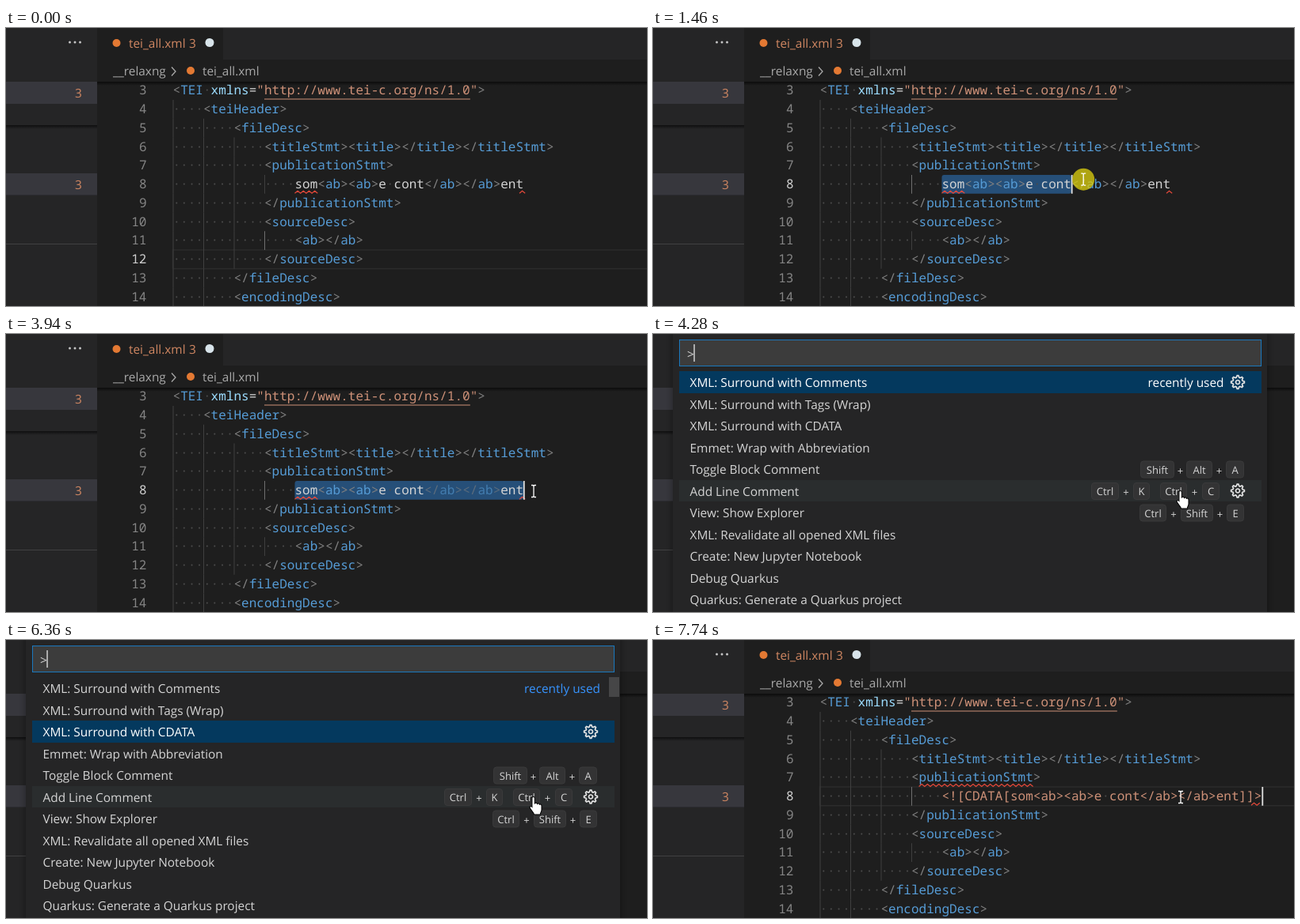
Write an HTML page that moves like this. It is 809 px wide and 352 px high and loops after 8000 ms.

```html
<!DOCTYPE html>
<html lang="en">
<head>
<meta charset="utf-8">
<title>Surround with CDATA</title>
<style>
  html, body { margin: 0; width: 100%; height: 100%; overflow: hidden; background: #1e1e1e; }
  svg { display: block; }
  text { text-rendering: geometricPrecision; }
  .ui { font: 15.4px "Open Sans", "Noto Sans", sans-serif; }
  .ui text { fill: #d4d4d4; }
  .ui .warn { fill: #d08762; }
  .ui .crumb { fill: #a9a9a9; }
  .key { font-size: 13px; text-anchor: middle; }
  .mono { font: 16.04px "Noto Sans Mono", "DejaVu Sans Mono", monospace; fill: #d4d4d4; }
  .num { text-anchor: end; fill: #858585; }
  .mark { fill: #4b4b4b; }
  .punct { fill: #808080; }
  .name { fill: #569cd6; }
  .attr { fill: #9cdcfe; }
  .str { fill: #ce9178; }
  .wave { fill: none; stroke: #e5493a; stroke-width: 1.2; }
</style>
</head>
<body>
<svg width="809" height="352" viewBox="0 0 809 352">
  <defs>
    <linearGradient id="fade" x2="0" y2="1">
      <stop stop-color="#000" stop-opacity=".6"/><stop offset="1" stop-color="#000" stop-opacity="0"/>
    </linearGradient>
    <filter id="soft" x="-5%" width="110%" y="-5%" height="110%"><feGaussianBlur stdDeviation="4"/></filter>
  </defs>

  <rect width="809" height="352" fill="#1e1e1e"/>
  <g id="code"></g>
  <rect x="115" y="40" width="694" height="28" fill="#1e1e1e"/>
  <rect x="115" y="68" width="694" height="5" fill="url(#fade)"/>

  <g class="ui">
    <rect width="115" height="352" fill="#252526"/>
    <rect y="68" width="115" height="28" fill="#37373d"/>
    <rect y="123" width="115" height="5" fill="url(#fade)"/>
    <rect y="184" width="115" height="27.5" fill="#37373d"/>
    <rect y="273" width="115" height="1" fill="#414142"/>
    <g fill="#c5c5c5"><circle cx="80.5" cy="18" r="1.5"/><circle cx="87" cy="18" r="1.5"/><circle cx="93.5" cy="18" r="1.5"/></g>
    <text class="warn" x="87" y="87.5">3</text>
    <text class="warn" x="87" y="203.5">3</text>
    <rect x="274" width="535" height="40" fill="#252526"/>
    <circle cx="139.5" cy="19" r="5" fill="#e37933"/>
    <text class="warn" x="155" y="25">tei_all.xml</text>
    <text class="warn" x="231" y="24.5">3</text>
    <circle cx="257" cy="18.5" r="5.5" fill="#d8e4ea"/>
    <text class="crumb" x="135" y="60">__relaxng</text>
    <path d="M209 49.5l5 5.5l-5 5.5" fill="none" stroke="#a9a9a9" stroke-width="1.3"/>
    <circle cx="233" cy="54" r="5" fill="#e37933"/>
    <text class="crumb" x="248" y="60">tei_all.xml</text>
  </g>

  <g id="palette" class="ui">
    <rect x="25" y="-10" width="750" height="380" filter="url(#soft)" opacity=".4"/>
    <rect x="25" width="750" height="352" fill="#252526"/>
    <rect x="33.5" y="7.5" width="734" height="33" fill="#3c3c3c" stroke="#1a78bd"/>
    <text x="43" y="31">&gt;</text>
    <rect id="prompt" x="51.3" y="13" width="1.5" height="22" fill="#d0d0d0"/>
    <rect x="33" y="185" width="735" height="27" fill="#2a2d2e"/>
    <rect id="focus" x="33" width="735" fill="#04395e"/>
    <g id="list"></g>
    <text id="recent" y="67" text-anchor="end">recently used</text>
    <rect id="bar" x="761" y="47" width="13" height="25" fill="#464647"/>
  </g>

  <g id="mouse">
    <circle id="press" r="14" fill="#d8cc10"/>
    <path d="M-3 -7.5H-1L0 -6.5L1 -7.5H3M0 -6.5V6.5M-3 7.5H-1L0 6.5L1 7.5H3" fill="none" stroke="#fff" stroke-width="1.3"/>
  </g>
  <path id="hand" transform="translate(665.5 199) scale(1.05)" fill="#fff" stroke="#000"
    d="M-1.5 1.2a1.6 1.6 0 0 1 3.2 0v6.3c.8-1 2.9-.7 3 .6c.8-.8 2.7-.5 2.8.8c.9-.6 2.5-.1 2.5 1.3v5.3c0 2-1.6 3.3-1.6 5.5H1c-.3-2.2-3-4.3-4.9-7.6c-1.2-2 1-3.2 2.4-1.6z"/>
</svg>

<script>
const $ = id => document.getElementById(id);
const LOOP = 8000, LEFT = 210.5, CELL = 9.624, LINE = 23.75;
const col = n => LEFT + n * CELL;
const base = n => 203 + (n - 8) * LINE;
const lineTop = n => base(n) - 17;

const span = (cls, s) => s
  ? `<tspan class="${cls}">${s.replace(/</g, '&lt;').replace(/>/g, '&gt;').replace(/ /g, '·')}</tspan>` : '';

// Colours one piece of XML; spaces become visible dots.
const tint = s => s.replace(
  /(<\/?)(\w*)|(>)|( +)|(\w+)(?==)|("[^"]*")|([^<>" ]+)/g,
  (m, open, name, close, gap, attr, str, text) =>
    span('punct', open) + span('name', name) + span('punct', close) +
    span('mark', gap) + span('attr', attr) + span('str', str) + span('', text));

const row = (n, indent, body, id = '') =>
  `<text class="mono" id="${id}" x="${LEFT}" y="${base(n)}">${span('mark', ' '.repeat(indent))}${body}</text>`;

const wave = (id, n, from, to) => {
  let d = '';
  for (let x = from, i = 0; x <= to; x += 3.6, i++)
    d += `${i ? 'L' : 'M'}${x} ${base(n) + (i % 2 ? 3.2 : 6.2)}`;
  return `<path class="wave" id="${id}" d="${d}"/>`;
};

const source = [
  [0, '<TEI xmlns="http://www.tei-c.org/ns/1.0">'],
  [4, '<teiHeader>'],
  [8, '<fileDesc>'],
  [12, '<titleStmt><title></title></titleStmt>'],
  [12, '<publicationStmt>'],
  [16, ''],
  [12, '</publicationStmt>'],
  [12, '<sourceDesc>'],
  [16, '<ab></ab>'],
  [12, '</sourceDesc>'],
  [8, '</fileDesc>'],
  [8, '<encodingDesc>']
];
const head = 'som<ab><ab>e cont', tail = '</ab></ab>';

function buildCode() {
  let guides = '', rows = '';
  source.forEach(([indent, xml], i) => {
    const n = i + 3;
    for (let c = 0; c < indent; c += 4)
      guides += `<rect ${c === 12 ? `id="guide${n}"` : ''} x="${col(c)}" y="${lineTop(n)}" width="1" height="${LINE}" fill="#404040"/>`;
    rows += `<text class="mono num" id="num${n}" x="177.5" y="${base(n)}">${n}</text>`;
    if (xml) rows += row(n, indent, tint(xml));
  });
  rows += row(8, 16, `${tint(head)}<tspan id="tail">${tint(tail)}</tspan>${tint('ent')}`, 'raw');
  rows += row(8, 16, span('', '<![CDATA[') + tint(head + tail + 'ent') + span('', ']]>'), 'mixed');
  const [a, b] = `<![CDATA[${head}${tail}ent]]>`.split(' ');
  rows += row(8, 16, span('str', a) + span('mark', ' ') + span('str', b), 'cdata');

  $('code').innerHTML =
    `<rect id="current" x="${LEFT}" width="610" height="${LINE}" fill="none" stroke="#2b2b2b" stroke-width="1.5"/>` +
    guides +
    `<rect id="sel" x="${col(16)}" y="${lineTop(8)}" height="${LINE}" rx="3" fill="#264f78"/>` + rows +
    `<rect x="${col(12)}" y="89.5" width="${27 * CELL}" height="1" fill="#ce9178"/>` +
    wave('waveRaw', 8, col(16), col(19)) + wave('waveEnd', 8, 648, 656) +
    wave('waveMid', 8, col(25), col(28)) + wave('waveMidEnd', 8, 763, 771) +
    wave('waveTag', 7, col(13), col(28)) + wave('waveClose', 8, 755, 766) +
    `<rect id="caret" y="${lineTop(8)}" width="1.8" height="${LINE}" fill="#e0e0e0"/>`;
}

const rowTop = i => Math.round(47 + i * 27.5);
const rowMid = i => 61.5 + i * 27.5;

function gear(y, id) {
  let d = '';
  for (let i = 0; i < 32; i++) {
    const a = (i - 0.5) * Math.PI / 16, r = i % 4 < 2 ? 8.4 : 6.2;
    d += `${i ? 'L' : 'M'}${(r * Math.cos(a)).toFixed(2)} ${(r * Math.sin(a)).toFixed(2)}`;
  }
  return `<g id="${id}" transform="translate(738 ${y})" fill="none" stroke="#e4e4e4" stroke-width="1.7"><path d="${d}Z"/><circle r="2.5"/></g>`;
}

// Each chord is a run of keys: label, x, width.
const commands = [
  ['XML: Surround with Comments'],
  ['XML: Surround with Tags (Wrap)'],
  ['XML: Surround with CDATA'],
  ['Emmet: Wrap with Abbreviation'],
  ['Toggle Block Comment', [['Shift', 615, 43], ['Alt', 673, 33], ['A', 723, 23]]],
  ['Add Line Comment', [['Ctrl', 553, 35], ['K', 606, 21]], [['Ctrl', 640, 34], ['C', 693, 22]]],
  ['View: Show Explorer', [['Ctrl', 614, 34], ['Shift', 666, 41], ['E', 724, 22]]],
  ['XML: Revalidate all opened XML files'],
  ['Create: New Jupyter Notebook'],
  ['Debug Quarkus'],
  ['Quarkus: Generate a Quarkus project']
];

function buildList() {
  let out = '';
  commands.forEach(([label, ...chords], i) => {
    const y = rowMid(i);
    out += `<text id="cmd${i}" x="46.5" y="${y + 5.5}">${label}</text>`;
    for (const chord of chords) chord.forEach(([key, x, w], k) => {
      out += `<rect x="${x + 0.5}" y="${y - 10.5}" width="${w - 1}" height="21" rx="3.5" fill="#333334" stroke="#3a3a3b"/>` +
        `<text class="key" x="${x + w / 2}" y="${y + 5}">${key}</text>`;
      if (k) {
        const [, px, pw] = chord[k - 1];
        out += `<text class="key" x="${(px + pw + x) / 2}" y="${y + 6}">+</text>`;
      }
    });
  });
  $('list').innerHTML = out + gear(rowMid(5) - 0.5, 'hoverGear') + gear(0, 'focusGear');
}

const show = (id, on) => { $(id).style.display = on ? '' : 'none'; };
const set = (id, key, value) => $(id).setAttribute(key, value);
const within = (t, ...spans) => spans.some(([a, b]) => t >= a && t < b);
const mix = (a, b, p) => a + (b - a) * p;

// Progress in n even jumps, the first at a and the last at b.
const steps = (t, a, b, n) =>
  Math.min(1, Math.max(0, (Math.floor((t - a) / (b - a) * (n - 1) + 1e-6) + 1) / n));

function mouseAt(t) {
  if (t < 960) {
    const p = steps(t, 140, 870, 11);
    if (p < 0.7) {
      const q = p / 0.7;
      return [mix(452, 337, q), mix(250, 156, q)];
    }
    const q = (p - 0.7) / 0.3;
    return [mix(337, 364, q), mix(156, 197, q)];
  }
  if (t < 1840) {
    const p = steps(t, 960, 1750, 11);
    return [364 + 262 * p ** 0.84, 198 - 7 * Math.sin(Math.PI * p)];
  }
  const p = steps(t, 1840, 2060, 4);
  return [mix(626, 666, p), mix(198, 199, p)];
}

function drawEditor(t) {
  const dragged = t >= 960, edited = t >= 6720, checked = t >= 7220;
  const [x, y] = mouseAt(t);
  const chars = dragged ? Math.min(30, Math.max(0, Math.floor((x - 364) / CELL - 1))) : 0;

  show('raw', !edited);
  show('mixed', within(t, [6720, 6790]));
  show('cdata', t >= 6790);
  set('tail', 'fill-opacity', t >= 2060 ? 0.6 : 1);
  show('waveRaw', !edited);
  show('waveEnd', !edited);
  show('waveMid', edited && !checked);
  show('waveMidEnd', edited && !checked);
  show('waveTag', checked);
  show('waveClose', checked);

  show('sel', dragged && !edited);
  set('sel', 'width', chars * CELL);
  set('caret', 'x', col(edited ? 58 : 16 + chars) - 0.3);
  show('caret', within(t, [960, 2400], [2900, 3430], [3940, 4280], [6720, 7220], [7740, LOOP]));

  show('current', !dragged || edited);
  set('current', 'y', lineTop(edited ? 8 : 12));
  $('num12').style.fill = dragged ? '' : '#d0d0d0';
  $('num8').style.fill = dragged ? '#d0d0d0' : '';
  set('guide11', 'fill', dragged ? '#404040' : '#707070');
  set('guide8', 'fill', dragged ? '#707070' : '#404040');

  set('mouse', 'transform', `translate(${x} ${y})`);
  set('press', 'opacity', within(t, [960, 2340]) ? 0.78 : within(t, [2340, 2400]) ? 0.35 : 0);
}

function drawPalette(t) {
  const open = within(t, [4280, 6660]);
  show('palette', open);
  show('hand', open);
  show('mouse', t >= 140 && !open);
  if (!open) return;
  const pick = t < 5580 ? 0 : t < 6010 ? 1 : 2;
  show('prompt', within(t, [4280, 4860], [5280, 5860], [6360, 6660]));
  show('bar', t >= 4350);
  set('focus', 'y', rowTop(pick));
  set('focus', 'height', rowTop(pick + 1) - rowTop(pick));
  set('focusGear', 'transform', `translate(738 ${rowMid(pick) - 0.5})`);
  for (let i = 0; i < 3; i++) $('cmd' + i).style.fill = i === pick ? '#fff' : '';
  set('recent', 'x', pick ? 750 : 720.5);
  $('recent').style.fill = pick ? '#3794ff' : '#fff';
}

function draw() {
  const t = performance.now() % LOOP;
  drawEditor(t);
  drawPalette(t);
  requestAnimationFrame(draw);
}

buildCode();
buildList();
draw();
</script>
</body>
</html>
```
